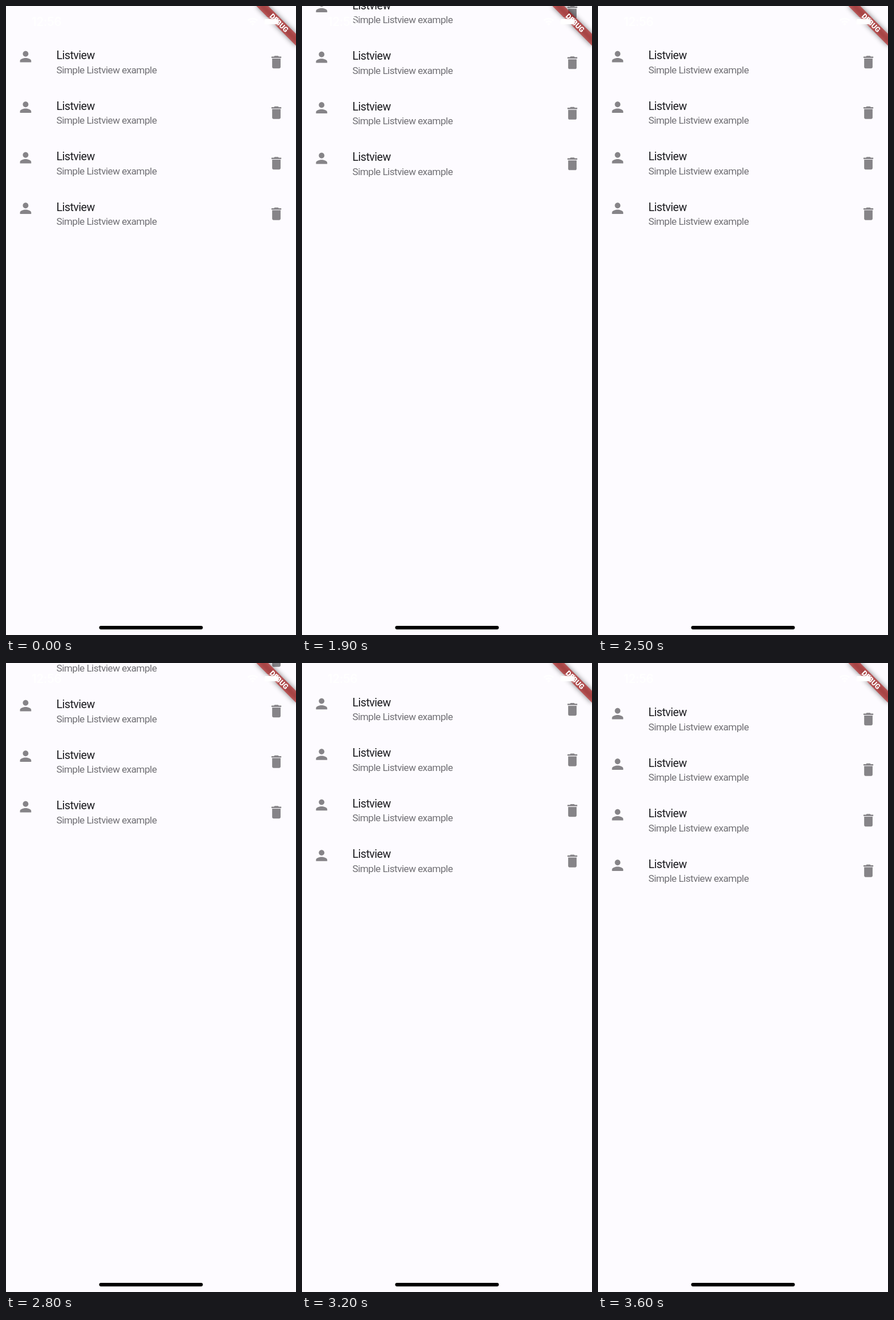
An HTML page that plays this animation: 509x1101 px, repeating every 3700 ms.

```html
<!DOCTYPE html>
<html lang="en">
<head>
<meta charset="utf-8">
<title>Listview</title>
<style>
  html, body { margin: 0; width: 100%; height: 100%; overflow: hidden; background: #fdfbff; }
  svg { display: block; width: 100%; height: 100%; }
  text { font-family: Roboto, Inter, sans-serif; }
  .title { font-size: 19.67px; letter-spacing: -.53px; fill: #1b1b1f; }
  .sub { font-size: 17.2px; letter-spacing: -.54px; fill: #706f74; }
  .icon { fill: #868488; }
  .label { font-size: 12.54px; font-weight: 900; fill: #fff; text-anchor: middle; }
  .clock { font: 600 20.9px Inter, Roboto, sans-serif; letter-spacing: -.5px; }
</style>
</head>
<body>
<svg viewBox="0 0 509 1101">
  <defs>
    <filter id="blur" x="-50%" y="-150%" width="200%" height="400%">
      <feGaussianBlur stdDeviation="4.87"/>
    </filter>
    <g id="row">
      <path class="icon" transform="translate(19.67 73.9) scale(1.2295)"
        d="M12 12c2.21 0 4-1.79 4-4s-1.79-4-4-4-4 1.79-4 4 1.79 4 4 4zm0 2c-2.67 0-8 1.34-8 4v2h16v-2c0-2.66-5.33-4-8-4z"/>
      <text class="title" x="88.5" y="93">Listview</text>
      <text class="sub" x="88.5" y="117.6">Simple Listview example</text>
      <path class="icon" transform="translate(459.8 83.5) scale(1.2295)"
        d="M6 19c0 1.1.9 2 2 2h8c1.1 0 2-.9 2-2V7H6v12zM19 4h-3.5l-1-1h-5l-1 1H5v2h14V4z"/>
    </g>
  </defs>
  <rect width="509" height="1101" fill="#fdfbff"/>

  <g id="list">
    <use href="#row"/>
    <use href="#row" y="88.5"/>
    <use href="#row" y="177"/>
    <use href="#row" y="265.5"/>
  </g>

  <g transform="translate(509 0) rotate(45)">
    <rect x="-49.2" y="34.43" width="98.4" height="14.75" fill="#000" opacity=".5" filter="url(#blur)"/>
    <rect x="-49.2" y="34.43" width="98.4" height="14.75" fill="#b71c1c" opacity=".627"/>
    <text class="label" y="46.3">DEBUG</text>
  </g>

  <g fill="#fff">
    <text class="clock" x="45" y="35">12:56</text>
    <g fill="none" stroke="#fff" stroke-width="2.6">
      <path d="M424.8 25.2a12 12 0 0 1 16.4 0"/>
      <path d="M428 28.8a7.4 7.4 0 0 1 10 0"/>
    </g>
    <path d="M433 34.2l-2.7-2.8a4 4 0 0 1 5.4 0z"/>
    <rect x="451.6" y="20.6" width="28.2" height="13.6" rx="3.6" fill="none" stroke="#fff" stroke-width="1.2" opacity=".38"/>
    <rect x="453.6" y="22.6" width="24.2" height="9.6" rx="2"/>
    <path d="M481.4 25v4.8q1.7-.8 1.7-2.4t-1.7-2.4z" opacity=".4"/>
  </g>

  <rect x="163.5" y="1085" width="182" height="6.2" rx="3.1" fill="#000"/>
</svg>
<script>
const LOOP = 3700, STEP = 100;
const list = document.getElementById('list');

// Each pull: finger positions per step, then release time and depth.
const pulls = [
  { from: 1600, drag: [-17.5, -85, -138], release: 1805, depth: -138.5 },
  { from: 2800, drag: [-102.5], release: 2900, depth: -155 }
];

// Overdamped bounce-back spring starting at rest.
function spring(s) {
  const slow = 9.08, fast = 22.03;
  return (fast * Math.exp(-slow * s) - slow * Math.exp(-fast * s)) / (fast - slow);
}

function offsetAt(t) {
  const pull = pulls.filter(p => t >= p.from).pop();
  if (!pull) return 0;
  const i = (t - pull.from) / STEP;
  if (i < pull.drag.length) return pull.drag[i];
  const y = pull.depth * spring((t - pull.release) / 1000);
  return y > -0.47 ? 0 : y;
}

function draw(ms) {
  const t = Math.floor((ms % LOOP) / STEP) * STEP;
  list.setAttribute('transform', `translate(0 ${offsetAt(t).toFixed(2)})`);
}

const start = performance.now();
function tick() {
  draw(performance.now() - start);
  requestAnimationFrame(tick);
}
tick();
</script>
</body>
</html>
```
